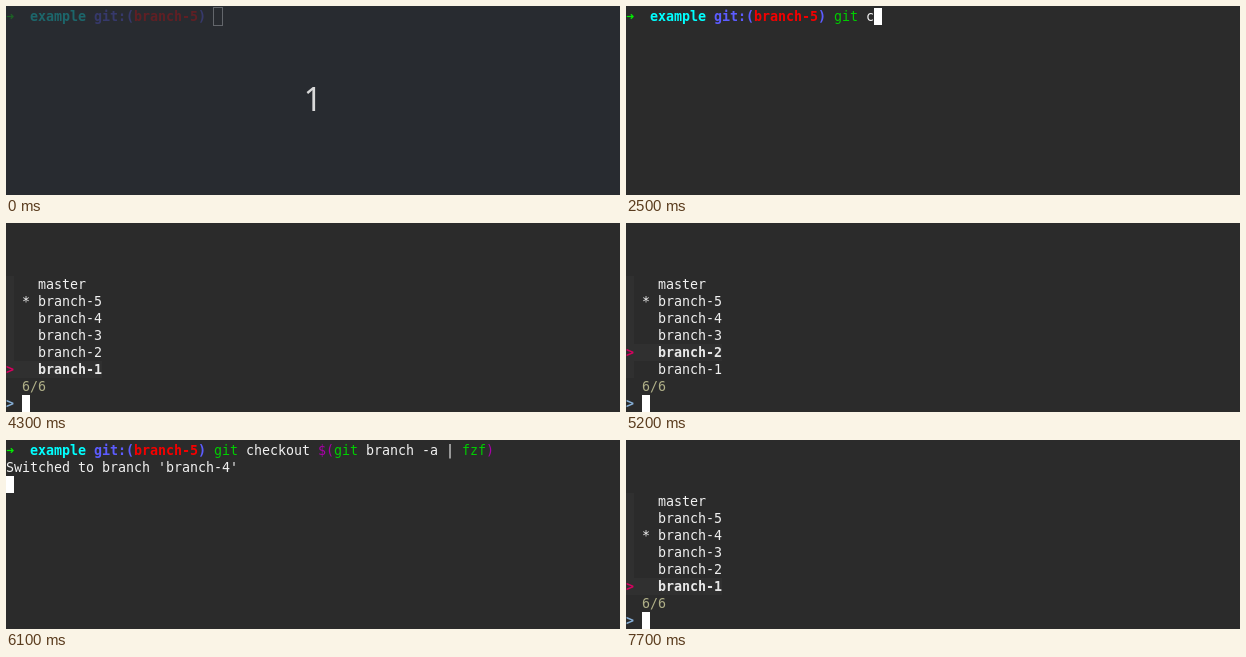
Write an HTML page with a canvas that moves like this. It is 614 by 189 pixels and loops after 8 s.

```html
<!DOCTYPE html>
<html lang="en">
<head>
<meta charset="utf-8">
<title>Terminal</title>
<style>
html, body { margin: 0; width: 100%; height: 100%; overflow: hidden; background: #2b2b2b; }
canvas { display: block; }
</style>
</head>
<body>
<canvas width="614" height="189"></canvas>
<script>
const ctx = document.querySelector('canvas').getContext('2d');
const LOOP = 8000, CELL_W = 8, CELL_H = 17, TOP = 2;
const WHITE = '#f0f0f0', GREEN = '#00cd00', MAGENTA = '#a800a8';
const COMMAND = [['git', GREEN], [' checkout ', WHITE], ['$(', MAGENTA], ['git', GREEN],
  [' branch -a | ', WHITE], ['fzf', GREEN], [')', MAGENTA]];
const COMMAND_COL = 26, COMMAND_END = 61;

function fillCells(col, row, count, color, rows = 1) {
  ctx.fillStyle = color;
  ctx.fillRect(col * CELL_W, TOP + row * CELL_H, count * CELL_W, rows * CELL_H);
}

function cursor(col, row) {
  fillCells(col, row, 1, '#fff');
}

// Each character sits on the cell grid; returns the column after the text.
function write(text, col, row, color = WHITE, bold = false) {
  ctx.font = `${bold ? 'bold ' : ''}13.333px "DejaVu Sans Mono", monospace`;
  ctx.fillStyle = color;
  for (const char of text) ctx.fillText(char, col++ * CELL_W, TOP + row * CELL_H + 13);
  return col;
}

function prompt(row, branch) {
  write('➜', 0, row, '#00f000', true);
  write('example', 3, row, '#00ffff', true);
  write('git:(', 11, row, '#5c5cff', true);
  write(branch, 16, row, '#f40000', true);
  write(')', 24, row, '#5c5cff', true);
}

function command(row, length = Infinity) {
  let col = COMMAND_COL;
  for (const [text, color] of COMMAND) {
    const shown = text.slice(0, Math.max(0, COMMAND_COL + length - col));
    col = write(shown, col, row, color);
  }
  return col;
}

function hollowCursor() {
  ctx.strokeStyle = '#fff';
  ctx.strokeRect(207.5, 1.5, 9, 18);
}

function finder(checkedOut, selected, cursorOn = true) {
  const items = ['master', 'branch-5', 'branch-4', 'branch-3', 'branch-2', 'branch-1'];
  fillCells(0, 3, 1, '#303030', items.length);
  items.forEach((name, i) => {
    const row = 3 + i, active = name === selected;
    if (active) {
      fillCells(0, row, 12, '#303030');
      write('>', 0, row, '#d7005f', true);
    }
    if (name === checkedOut) write('*', 2, row);
    write(name, 4, row, active ? '#e8e8e8' : WHITE, active);
  });
  write('6/6', 2, 9, '#afaf87');
  finderPrompt(cursorOn);
}

function finderPrompt(cursorOn = true) {
  write('>', 0, 10, '#87afd7', true);
  if (cursorOn) cursor(2, 10);
}

function countdown() {
  ctx.fillStyle = 'rgba(39, 43, 51, .72)';
  ctx.fillRect(0, 0, 614, 189);
  ctx.fillStyle = '#d9d9d9';
  ctx.font = '32px "Noto Sans", sans-serif';
  ctx.textAlign = 'center';
  ctx.fillText('1', 307, 105);
  ctx.textAlign = 'left';
}

function firstCommand(t) {
  prompt(0, 'branch-5');
  if (t < 1900) hollowCursor();
  else if (t < 2500) cursor(COMMAND_COL, 0);
  else {
    const end = command(0, t < 2900 ? 5 : Infinity);
    if (t < 3400 || t >= 4200) cursor(end, 0);
  }
  if (t < 100) countdown();
}

function secondCommand(t) {
  prompt(0, 'branch-5');
  command(0);
  write("Switched to branch 'branch-4'", 0, 1);
  if (t < 6500) return cursor(0, 2);
  prompt(2, 'branch-4');
  if (t < 6700) return cursor(COMMAND_COL, 2);
  command(2);
  if (t < 7400) cursor(COMMAND_END, 2);
}

function draw(t) {
  ctx.fillStyle = '#2b2b2b';
  ctx.fillRect(0, 0, 614, 189);
  if (t < 4300) firstCommand(t);
  else if (t < 6100) {
    const selected = t < 5200 ? 1 : t < 5400 ? 2 : t < 5700 ? 3 : 4;
    finder('branch-5', 'branch-' + selected, t < 4800 || t >= 5200);
  }
  else if (t < 7600) secondCommand(t);
  else if (t < 7700) finderPrompt();
  else finder('branch-4', 'branch-1');
}

const start = performance.now();
function tick() {
  draw((performance.now() - start) % LOOP);
  requestAnimationFrame(tick);
}
tick();
</script>
</body>
</html>
```
